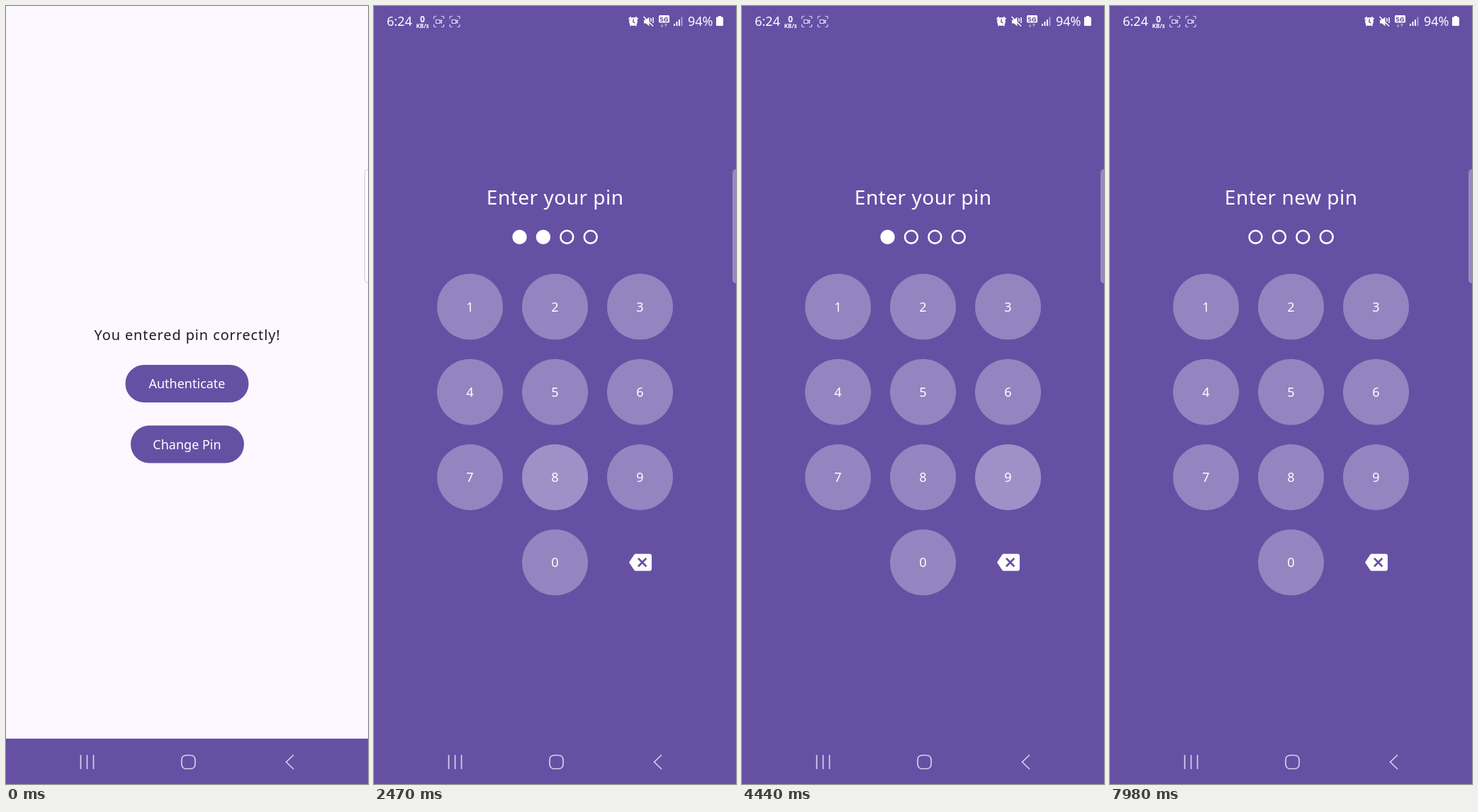
An HTML page that plays this animation: 511x1097 px, repeating every 8000 ms.

```html
<!DOCTYPE html>
<html lang="en">
<head>
<meta charset="utf-8">
<title>Pin lock</title>
<style>
  html, body { margin: 0; width: 100%; height: 100%; overflow: hidden; background: #fdf8ff; }
  #stage { position: relative; width: 100%; height: 100%; overflow: hidden; contain: strict; }
  svg, #pin, .row { position: absolute; left: 0; top: 0; display: block; }
  #stage > svg, #pin, #pin > svg { width: 100%; height: 100%; overflow: hidden; }
  #pin { overflow: hidden; }
  .row { width: 511px; height: 50px; }
  .row svg { width: 511px; height: 50px; }
  text { font-family: "Noto Sans", "Open Sans", sans-serif; font-size: 18px; text-anchor: middle; fill: #fff; }
  .left { text-anchor: start; }
  .line { fill: none; stroke: #fff; }
  #title { font-size: 28px; letter-spacing: .5px; }
</style>
</head>
<body>
<div id="stage">
<svg>
  <rect x="506.5" y="230.5" width="14" height="160" rx="5" fill="#fff" stroke="#c6c3e4"/>
  <text x="256" y="471" style="font-size:20px;letter-spacing:.87px;fill:#1d1b20">You entered pin correctly!</text>
  <g fill="#6650a4">
    <rect x="168.500" y="506" width="174" height="53" rx="26.500"/>
    <rect x="176" y="591.500" width="160" height="53" rx="26.500"/>
    <rect y="1033" width="511" height="64"/>
  </g>
  <text x="255.500" y="539">Authenticate</text>
  <text x="255.500" y="624.500">Change Pin</text>
</svg>

<div id="pin">
  <svg>
    <rect width="511" height="1097" fill="#6650a4"/>
    <rect x="506" y="230" width="14" height="161" rx="5" fill="#fff" opacity=".32"/>
    <g id="keys" fill="#fff" fill-opacity=".3"></g>
    <circle id="ripple" fill="#fff"/>
    <g id="digits"></g>
    <path transform="translate(360 768.5) scale(1.333)" fill="#fff" d="M22 3H7c-.69 0-1.23.35-1.59.88L0 12l5.41 8.11c.36.53.9.89 1.59.89h15c1.1 0 2-.9 2-2V5c0-1.1-.9-2-2-2zm-3 12.59L17.59 17 14 13.41 10.41 17 9 15.59 12.59 12 9 8.41 10.41 7 14 10.59 17.59 7 19 8.41 15.41 12 19 15.59z"/>

    <!-- status bar -->
    <text class="left" x="18" y="28" font-weight="500">6:24</text>
    <text x="68.500" y="22.500" style="font-size:12px;font-weight:600">0</text>
    <text x="68.500" y="31" style="font-size:8px;font-weight:700">KB/s</text>
    <defs>
      <path id="corners" class="line" stroke-width="1.200" d="M0 3.500V1.500Q0 0 1.500 0H3.500M10.500 0h2Q14 0 14 1.500V3.500M14 11.500v2Q14 15 12.500 15H10.500M3.500 15H1.500Q0 15 0 13.500V11.500"/>
      <path id="camera" class="line" stroke-width="1.100" d="M3 5h5.500v5H3zM8.500 7L11 5.500v4L8.500 8"/>
    </defs>
    <g opacity=".8">
      <use href="#corners" x="84.500" y="14.500"/>
      <use href="#camera" x="84.500" y="14.500" id="blink"/>
      <use href="#corners" x="107" y="14.500"/>
      <use href="#camera" x="107" y="14.500"/>
    </g>
    <g fill="#fff">
      <circle cx="366" cy="22" r="6"/>
      <path class="line" stroke-width="2" d="M359.500 18.500l3.500-3M372.500 18.500l-3.500-3M361.500 28l1.500-2M370.500 28l-1.500-2"/>
      <path class="line" style="stroke:#6650a4" stroke-width="1.400" d="M366 18.500V22.500L368.500 24"/>
      <path d="M381 19.500h3l4.500-4v13l-4.500-4h-3z"/>
      <path class="line" stroke-width="1.500" d="M380.500 15L394 28.500M391 17v5M394 16v8"/>
      <rect x="402" y="13" width="15" height="10.500" rx="1.500"/>
      <path class="line" opacity=".5" d="M406.500 25v4.500M404.500 27.500l2 2 2-2M412 29.500V25M410 27l2-2 2 2"/>
      <path d="M423 25h2v3h-2zM426.500 22h2v6h-2zM430 19h2v9h-2z"/>
      <path opacity=".45" d="M433.500 15.500h2V28h-2z"/>
      <path d="M486 14h4v1.500h2q1 0 1 1V27q0 1-1 1h-8q-1 0-1-1V16.500q0-1 1-1h2z"/>
    </g>
    <text x="409.500" y="21.700" style="font-size:9.500px;font-weight:700;fill:#6650a4">5G</text>
    <text class="left" x="443" y="28" font-weight="500">94%</text>
  </svg>
  <div class="row" style="top:246px"><svg><text id="title" x="255.700" y="34"></text></svg></div>
  <div class="row" style="top:301px"><svg><g id="dots" stroke="#fff" stroke-width="2.600"></g></svg></div>
</div>

<svg>
  <g class="line" style="stroke:#d8d0eb" stroke-width="1.700">
    <path d="M105.500 1056v20M114.500 1056v20M123.500 1056v20M406 1056l-10.500 10 10.500 10"/>
    <rect x="248" y="1056.500" width="19" height="19" rx="6"/>
  </g>
</svg>
</div>

<script>
const LOOP = 8000, KEY_R = 46.5, HOLD = 80;
const SHAKE = { start: 3400, end: 4000, period: 200 };
const FADE = { start: 30, end: 390 };
const CLEARED = 6545;
// [press time, key]
const taps = [[1880, 7], [2310, 8], [2790, 9], [3220, 6],
              [4290, 9], [5480, 8], [5975, 7], [6460, 4]];
const blinks = [[1040, 1240], [3550, 3750], [7450, 7670]];

const el = id => document.getElementById(id);
const clamp = x => Math.min(1, Math.max(0, x));
const ease = x => x * x * (3 - 2 * x);

function add(parent, tag, attrs, text = "") {
  const node = document.createElementNS("http://www.w3.org/2000/svg", tag);
  for (const name in attrs) node.setAttribute(name, attrs[name]);
  node.textContent = text;
  return el(parent).appendChild(node);
}

function keyPos(n) {
  return n ? [135.5 + (n - 1) % 3 * 120, 424 + Math.floor((n - 1) / 3) * 120.2] : [255.5, 784.5];
}

for (let n = 0; n < 10; n++) {
  const [x, y] = keyPos(n);
  add("keys", "circle", { cx: x, cy: y, r: KEY_R });
  add("digits", "text", { x, y: y + 6.5 }, n);
}
const dots = [0, 1, 2, 3].map(i =>
  add("dots", "circle", { cx: 205.5 + i * 33.4, cy: 24.7, r: 8.9 }));
const rows = document.querySelectorAll(".row");

function drawRipple(t) {
  const tap = taps.findLast(([at]) => at <= t);
  const age = tap ? t - tap[0] : LOOP;
  const [x, y] = keyPos(tap ? tap[1] : 0);
  const ripple = el("ripple");
  ripple.setAttribute("cx", x);
  ripple.setAttribute("cy", y);
  ripple.setAttribute("r", Math.min(KEY_R, 28 + 50 * ease(clamp(age / 225))));
  ripple.setAttribute("opacity", 0.1 * clamp(age / 75) * clamp((375 - age) / 150));
}

function draw(t) {
  el("pin").style.opacity = ease(clamp((t - FADE.start) / (FADE.end - FADE.start)));
  el("title").textContent = t < CLEARED ? "Enter your pin" : "Enter new pin";

  const since = t < SHAKE.start ? 0 : t < CLEARED ? SHAKE.start : CLEARED;
  const filled = taps.filter(([at]) => at + HOLD > since && at + HOLD <= t).length;
  dots.forEach((dot, i) => dot.setAttribute("fill", i < filled ? "#fff" : "none"));

  const shaking = t >= SHAKE.start && t < SHAKE.end;
  const v = shaking ? Math.sin((t - SHAKE.start) / SHAKE.period * 2 * Math.PI) : 0;
  for (const row of rows) {
    row.style.transform = shaking
      ? `translateX(${-13 * v}px) perspective(290px) rotateY(${-20 * v}deg)` : "none";
  }

  drawRipple(t);
  el("blink").style.opacity = blinks.some(([a, b]) => t >= a && t < b) ? 0 : 1;
}

const begin = performance.now();
function tick() {
  draw((performance.now() - begin) % LOOP);
  requestAnimationFrame(tick);
}
tick();
</script>
</body>
</html>
```
